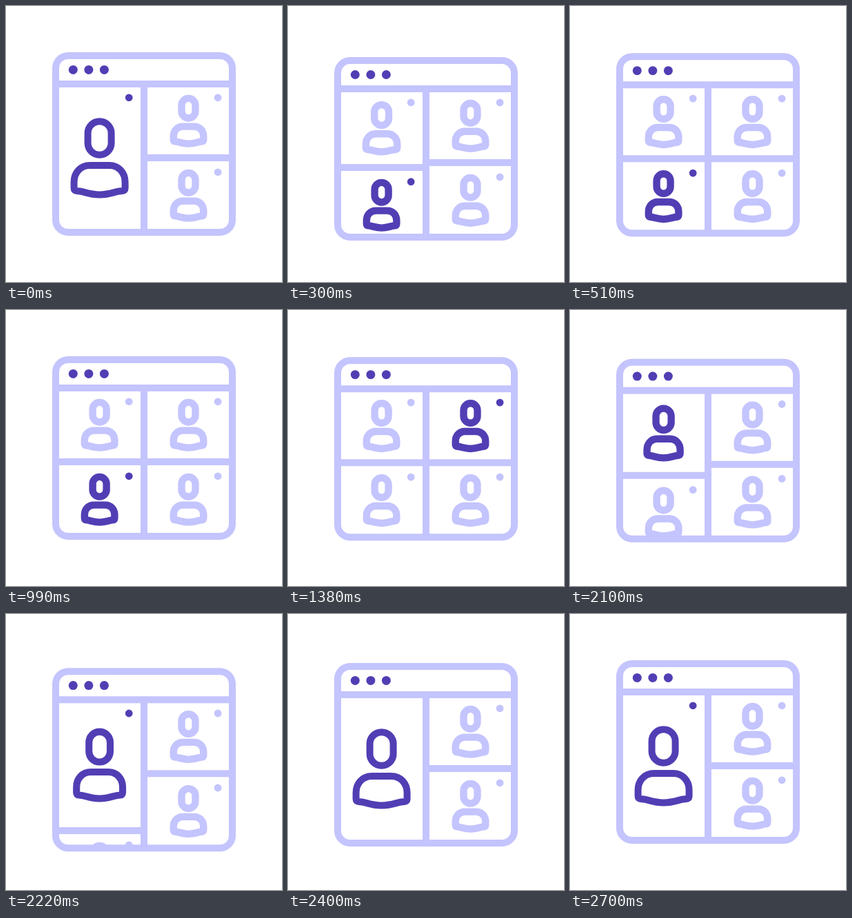
Write an HTML page with a canvas that moves like this. It is 400x400 px and loops after 2.73 s.

```html
<!DOCTYPE html>
<html lang="en">
<head>
<meta charset="utf-8">
<title>Video call</title>
<style>
html, body { margin: 0; width: 100%; height: 100%; overflow: hidden; background: #fff; }
canvas { display: block; width: 100vmin; height: 100vmin; }
</style>
</head>
<body>
<canvas id="stage"></canvas>
<script>
const LOOP = 2730, STEP = 30, SIZE = 400;
const DARK = '#523eb4', PALE = '#c4c4fe';
const canvas = document.getElementById('stage');
const ctx = canvas.getContext('2d');

const clamp = x => Math.min(1, Math.max(0, x));
const lerp = (a, b, k) => a + (b - a) * k;
const smooth = (t, from, to) => {
  const k = clamp((t - from) / (to - from));
  return k * k * (3 - 2 * k);
};

// Quick drop followed by a long, soft return
function dip(t, start, peak, end, depth) {
  if (t <= start || t >= end) return 0;
  if (t < peak) return depth * smooth(t, start, peak);
  return depth * Math.pow(1 - (t - peak) / (end - peak), 2.2);
}

const drop = t => dip(t, 15, 210, 690, 11.2)
  + dip(t, 1200, 1290, 1620, 2.6)
  + dip(t, 2025, 2220, 2700, 11.2);

// 1 = top left cell fills the column, 0 = four equal cells
const growth = t => t < 1200 ? 1 - smooth(t, 24, 350) : smooth(t, 2034, 2305);

function speaker(t) {
  if (t < 30 || t >= 2040) return 'topLeft';
  return t < 1230 ? 'lowLeft' : 'topRight';
}

const blinks = [540, 840, 1440, 1740, 2040, 2340];
const isBlinking = t => blinks.some(b => t >= b && t < b + 150);

function dot(x, y, r, color) {
  ctx.fillStyle = color;
  ctx.beginPath();
  ctx.arc(x, y, r, 0, Math.PI * 2);
  ctx.fill();
}

function line(x1, y1, x2, y2) {
  ctx.beginPath();
  ctx.moveTo(x1, y1);
  ctx.lineTo(x2, y2);
  ctx.stroke();
}

const body = new Path2D('M-14-21H14C28-21 37-10 37 3V12Q37 16 33 16' +
  'C24 16 16 21.5 0 21.5C-16 21.5-24 16-33 16Q-37 16-37 12V3C-37-10-28-21-14-21Z');

function person(x, y, color, grow) {
  const s = lerp(1, 1.7, grow), w = lerp(10.4, 10, grow);
  ctx.strokeStyle = color;
  ctx.lineWidth = w;
  ctx.lineJoin = 'round';
  ctx.beginPath();
  ctx.roundRect(x - 10 * s, y + lerp(148.2, 191.5, grow) - 14.3 * s, 20 * s, 28.6 * s, 10 * s);
  ctx.stroke();

  const k = s / 1.7;
  ctx.save();
  ctx.translate(x, y + lerp(187, 252, grow));
  ctx.scale(k, k);
  ctx.lineWidth = w / k;
  ctx.stroke(body);
  ctx.restore();
}

function cell(x, y, active, blink, grow = 0) {
  const color = active ? DARK : PALE;
  person(x, y, color, grow);
  if (!(active && blink)) dot(x + 42.6, y + 132.8, 5.4, color);
}

function draw(t) {
  const grow = growth(t), shift = 108 * grow;
  const who = speaker(t), blink = isBlinking(t);

  ctx.fillStyle = '#fff';
  ctx.fillRect(0, 0, SIZE, SIZE);
  ctx.save();
  ctx.translate(0, drop(t));

  ctx.save();
  ctx.beginPath();
  ctx.roundRect(72, 72, 256, 256, 18);
  ctx.clip();
  cell(135.6, 0, who === 'topLeft', blink, grow);
  cell(135.6, 108 + shift, who === 'lowLeft', blink);
  cell(264.5, 0, who === 'topRight', blink);
  cell(264.5, 108, false, blink);

  ctx.strokeStyle = PALE;
  ctx.lineWidth = 10;
  line(72, 113, 328, 113);
  line(200, 113, 200, 328);
  line(200, 220, 328, 220);
  line(72, 220 + shift, 200, 220 + shift);
  ctx.restore();

  ctx.strokeStyle = PALE;
  ctx.lineWidth = 10;
  ctx.beginPath();
  ctx.roundRect(72, 72, 256, 256, 18);
  ctx.stroke();
  for (const x of [97.3, 119.9, 142.4]) dot(x, 92.4, 6.5, DARK);
  ctx.restore();
}

function fit() {
  const px = Math.round(Math.min(innerWidth, innerHeight) * (devicePixelRatio || 1)) || SIZE;
  if (canvas.width !== px) canvas.width = canvas.height = px;
  ctx.setTransform(px / SIZE, 0, 0, px / SIZE, 0, 0);
}

const begin = performance.now();
function tick() {
  const t = (performance.now() - begin) % LOOP;
  fit();
  draw(Math.floor(t / STEP) * STEP);
  requestAnimationFrame(tick);
}
tick();
</script>
</body>
</html>
```
